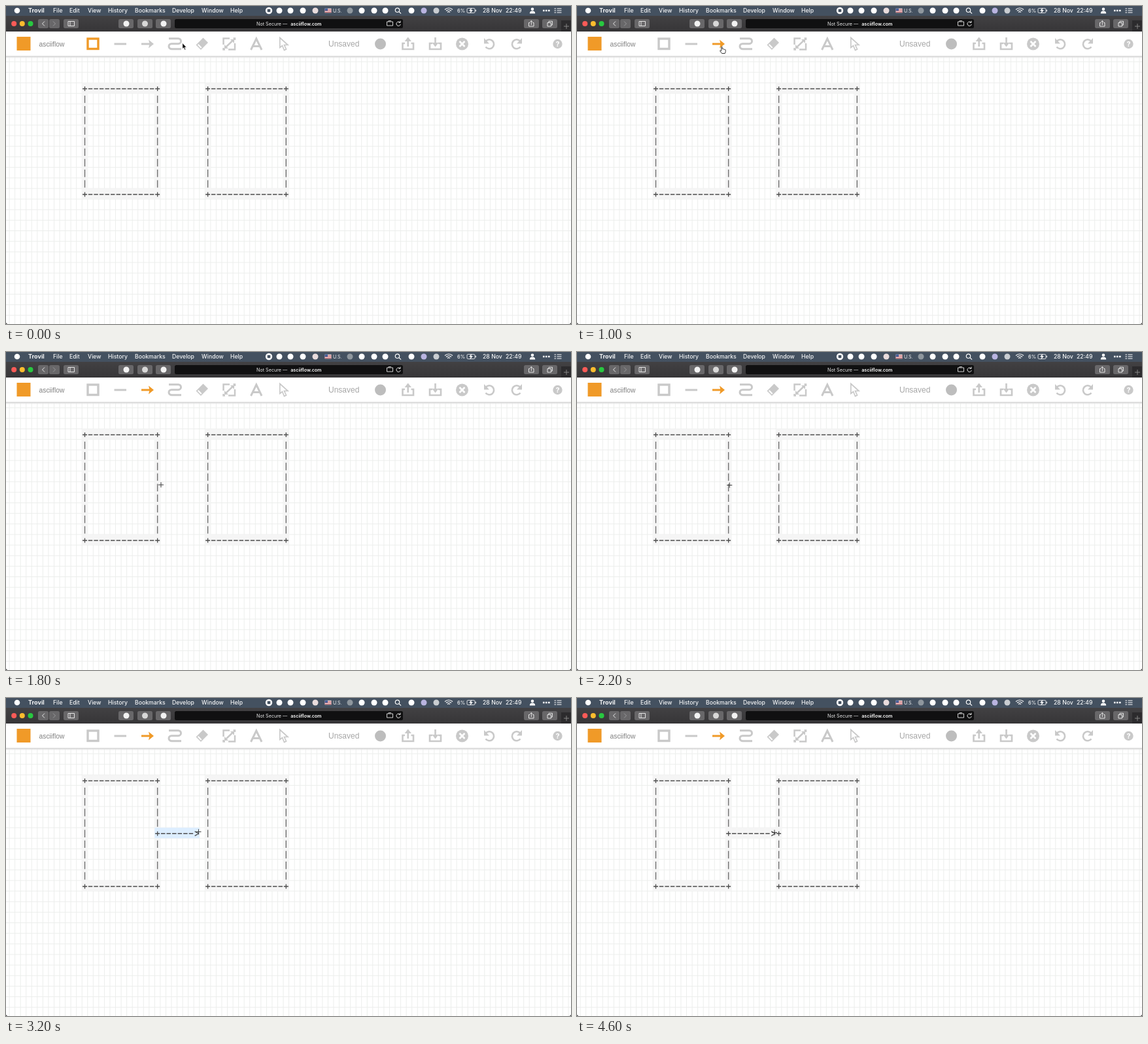
These frames come from a looping animation (864x486 px, 4.8 s). An HTML page:

```html
<!DOCTYPE html>
<html lang="en">
<head>
<meta charset="utf-8">
<title>Drawing an arrow</title>
<style>
  html, body { margin: 0; width: 100%; height: 100%; overflow: hidden; background: #111; }
  svg { display: block; width: 864px; height: 486px; }
  text { font-family: Inter, "Liberation Sans", sans-serif; white-space: pre; }
  .menu { font-size: 8.7px; font-weight: 500; fill: #f4f5f6; }
  .tool { fill: none; stroke: #c9c9c9; stroke-width: 3; }
  .tool .solid { fill: #c9c9c9; stroke: none; }
  .tool.on { stroke: #f09a28; }
  .tool.on .solid { fill: #f09a28; }
  .ui { fill: none; stroke: #e6e6e6; stroke-width: 1; }
  .glyphs { fill: none; stroke: #4c4c4c; stroke-width: 1.3; }
  .bars { fill: none; stroke: #707070; stroke-width: 1.4; }
</style>
</head>
<body>
<svg viewBox="0 0 864 486">
  <defs>
    <linearGradient id="bar" x2="0" y2="1">
      <stop stop-color="#424143"/><stop offset="1" stop-color="#363537"/>
    </linearGradient>
    <linearGradient id="shade" x2="0" y2="1">
      <stop stop-color="#c4c4c4"/><stop offset="1" stop-color="#fff" stop-opacity="0"/>
    </linearGradient>
  </defs>

  <!-- page -->
  <path d="M0 39H864V483a3 3 0 0 1-3 3H3a3 3 0 0 1-3-3Z" fill="#fff"/>
  <path id="grid" stroke="#eceeec" fill="none"/>
  <g id="board"></g>
  <g id="preview"></g>

  <!-- drawing toolbar -->
  <rect y="39" width="864" height="38" fill="#fff"/>
  <rect y="76.500" width="864" height="4.500" fill="url(#shade)"/>
  <rect x="16.500" y="47" width="21" height="21" fill="#f09a28"/>
  <text x="50.500" y="61.500" font-size="10.3" fill="#808080" style="font-family:'Liberation Sans',sans-serif">asciiflow</text>
  <text x="493" y="62.300" font-size="12" fill="#a6a6a6" style="font-family:'Liberation Sans',sans-serif">Unsaved</text>

  <g class="tool" id="boxTool"><rect x="125" y="50" width="16" height="15.500" stroke-width="3.400"/></g>
  <g class="tool"><path d="M165.500 58H184"/></g>
  <g class="tool" id="arrowTool"><path d="M207 58H221"/><path class="solid" d="M218 51.500L226 58L218 64.500L219.500 58Z"/></g>
  <g class="tool"><path d="M249 49.700H263.500a4 4 0 0 1 0 8H253a4 4 0 0 0 0 8H268"/></g>
  <g class="tool">
    <path class="solid" d="M301.500 48.500L309 56L298 67L290.500 59.500Z"/>
    <path d="M294.300 58L299.500 63.200L298 64.700L292.800 59.500Z" style="fill:#fff;stroke:none"/>
  </g>
  <g class="tool">
    <path d="M332.500 59V49.500H342M350 57V66.500H340M332.500 64V66.500H335M347.500 49.500H350V52M336 63L347 52.500" style="stroke-width:2.500"/>
    <path class="solid" d="M343 51H349V57ZM334 59V65H340Z"/>
  </g>
  <g class="tool"><path d="M374.500 67L382.800 50L391 67M378 61.500H388"/></g>
  <g class="tool"><path d="M418.800 48.500V63.500L422.500 60.500L425.500 67.500L428.500 66L425.500 59.500H431Z" style="stroke-width:1.700"/></g>

  <circle cx="572.500" cy="58" r="8.500" fill="#bdbdbd"/>
  <g class="tool" style="stroke-width:2.600">
    <path d="M610 57H606.500V66H623V57H619.500M614.700 62V53"/><path class="solid" d="M609.500 54L614.700 47.500L620 54Z"/>
    <path d="M652 57H648V66H665V57H661M656.500 48V57"/><path class="solid" d="M651.500 56L656.500 62.500L661.500 56Z"/>
    <circle class="solid" cx="697.500" cy="58" r="9.500"/>
    <path d="M693.500 54L701.500 62M701.500 54L693.500 62" stroke="#fff"/>
    <path d="M734 53.500A7 7 0 1 1 733.500 62.500"/><path class="solid" d="M731 49V57.500H739Z"/>
    <path d="M786 53.500A7 7 0 1 0 786.500 62.500"/><path class="solid" d="M789 49V57.500H781Z"/>
    <circle class="solid" cx="843.500" cy="58" r="7.200"/>
  </g>
  <text x="843.500" y="62" font-size="11" font-weight="700" fill="#fff" text-anchor="middle">?</text>

  <!-- browser bar -->
  <rect y="15" width="864" height="24" fill="url(#bar)"/>
  <circle cx="12.200" cy="27" r="4" fill="#fc5b57"/>
  <circle cx="24.800" cy="27" r="4" fill="#fdbc2e"/>
  <circle cx="37.500" cy="27" r="4" fill="#28c840"/>
  <g id="buttons" fill="#686769"></g>
  <rect x="258" y="20" width="349" height="14" rx="2.500" fill="#101011"/>
  <text x="383" y="29.700" font-size="7.200" fill="#e8e8e8">Not Secure —</text>
  <text x="435.300" y="29.700" font-size="7.100" font-weight="600" fill="#fff">asciiflow.com</text>
  <g class="ui">
    <path d="M59 23.500L55.500 27L59 30.500"/><path d="M72 23.500L75.500 27L72 30.500" stroke="#98989a"/>
    <path d="M95 23.500H104.500V30.500H95ZM98 23.500V30.500"/>
    <path d="M582.500 24H591.500V30H582.500ZM585 24V22.700H589" stroke-width=".9"/>
    <path d="M602.500 25A3.200 3.200 0 1 0 603.300 28M600.500 25.300H603V22.700"/>
    <path d="M801 25.500H799.500V31H807V25.500H805.500M803.300 29V22.500M801.300 24.500L803.300 22.500L805.300 24.500"/>
    <path d="M828 25.500H833.500V31H828ZM830 25.500V23.300H835.500V29H833.500"/>
  </g>
  <circle cx="184" cy="27" r="4.500" fill="#f2f2f2"/>
  <circle cx="212.500" cy="27" r="4.500" fill="#d8d8d8"/>
  <circle cx="241" cy="27" r="4.500" fill="#f2f2f2"/>
  <rect x="849" y="22" width="15" height="17" fill="#2c2b2d"/>
  <path d="M853 31H861M857 27V35" stroke="#858585"/>

  <!-- menu bar -->
  <rect width="864" height="15" fill="#445160"/>
  <circle cx="17" cy="7" r="4.300" fill="#fff"/>
  <g id="menus" class="menu"></g>
  <g id="marks"></g>
  <circle cx="402" cy="7" r="5.200" fill="#fff"/><rect x="399.700" y="4.700" width="4.600" height="4.600" rx=".7" fill="#445160"/>
  <rect x="487.500" y="3.700" width="10" height="6.600" fill="#f1eeee"/>
  <path d="M487.500 5.300H497.500M487.500 7.400H497.500M487.500 9.500H497.500" stroke="#c8555c"/>
  <rect x="487.500" y="3.700" width="4.500" height="3.600" fill="#46609a"/>
  <g class="ui" style="stroke:#fff;stroke-width:1.200">
    <circle cx="598.500" cy="6.300" r="3.200"/><path d="M601 8.700L604 11.700"/>
    <path d="M671 5.500Q677 .5 683 5.500M673 7.500Q677 4 681 7.500M675 9.400Q677 8 679 9.400"/>
    <rect x="705" y="3.500" width="12" height="7" rx="1.500" style="stroke-width:.8"/>
    <path d="M718.300 5.700V8.300"/>
    <path d="M838.500 4H841M842.500 4H849.500M838.500 7H841M842.500 7H849.500M838.500 10H841M842.500 10H849.500"/>
  </g>
  <path d="M712 2.500L708 7.500H710.500L709.500 11.500L714 6.300H711.500Z" fill="#fff"/>
  <circle cx="805" cy="4.700" r="2.300" fill="#fff"/><path d="M800.800 11.500Q800.800 7.500 805 7.500T809.200 11.500Z" fill="#fff"/>
  <path d="M821 5.700h2.600v2.600h-2.600zm4 0h2.600v2.600h-2.600zm4 0h2.600v2.600h-2.600z" fill="#fff"/>

  <!-- pointers -->
  <path id="arrow" d="M0 0V9L2 7.300L3.500 10.700L5 10L3.600 6.700H6.300Z" fill="#111" stroke="#fff" stroke-width=".7"/>
  <path id="hand" d="M-1.300 5.500V.6Q-.8-.6.200.6V3.700Q1.200 3 1.900 4Q3 3.400 3.600 4.500Q5.200 4.200 5.200 5.700V7.500Q5 9 4.200 10.500H-.4L-3.400 6.700Q-3.300 5-1.300 6.500Z" fill="#fff" stroke="#222" stroke-width=".9"/>
  <path id="cross" d="M-4 0H4M0-4V4" fill="none" stroke="#3c3c3c" stroke-width="1"/>
</svg>
<script>
  const LOOP = 4800, CW = 8.55, CH = 16.15, X0 = 120.5, Y0 = 126.5;
  const $ = id => document.getElementById(id);
  const colX = c => X0 + c * CW, rowY = r => Y0 + r * CH;
  // Top left corner of a cell; characters sit a little below its middle.
  const cellX = c => colX(c - .5), cellY = r => rowY(r - .5) - 1;

  // One drawn character, centred in its cell.
  const shapes = {
    '-': 'm-3.2 0h6.4',
    '|': 'm0-5.700v11.400',
    '+': 'm-3.500 0h7m-3.500-3.500v7',
    '>': 'm-2.800-3.400l5.800 3.400l-5.800 3.400'
  };
  const glyph = (ch, c, r) => `M${colX(c)} ${rowY(r)}${shapes[ch]}`;
  const cells = (c, r, w, h, fill) =>
    `<rect x="${cellX(c)}" y="${cellY(r)}" width="${w * CW}" height="${h * CH}" fill="${fill}"/>`;
  const strokes = (d, name = 'glyphs') => `<path class="${name}" d="${d}"/>`;

  function box(c, w, h, joint) {
    const end = c + w, fill = '#f5f5f5';
    let d = '', bars = '';
    for (const r of [0, h])
      for (let i = c; i <= end; i++) d += glyph(i === c || i === end ? '+' : '-', i, r);
    for (let r = 1; r < h; r++)
      for (const i of [c, end])
        if (i === joint && r === 5) d += glyph('+', i, r);
        else bars += glyph('|', i, r);
    return cells(c, 0, w + 1, 1, fill) + cells(c, h, w + 1, 1, fill) +
      cells(c, 1, 1, h - 1, fill) + cells(end, 1, 1, h - 1, fill) +
      strokes(bars, 'bars') + strokes(d);
  }

  function arrow(len, fill) {
    let d = glyph('+', 13, 5);
    for (let i = 1; i < len; i++) d += glyph('-', 13 + i, 5);
    if (len) d += glyph('>', 13 + len, 5);
    return cells(13, 5, len + 1, 1, fill) + strokes(d);
  }

  let lines = '';
  for (let c = -13; cellX(c) < 864; c++) lines += `M${cellX(c)} 78V486`;
  for (let r = -2; cellY(r) < 486; r++) lines += `M0 ${cellY(r)}H864`;
  $('grid').setAttribute('d', lines);

  $('buttons').innerHTML = [[49, 16], [66, 16], [88, 23], [172, 23], [201, 23], [229, 23], [792, 23], [820, 23]]
    .map(([x, w]) => `<rect x="${x}" y="20" width="${w}" height="14" rx="2.500"/>`).join('');

  $('menus').innerHTML = [
    [34, 'Trovil', 9.1, 700], [72, 'File'], [97, 'Edit'], [125, 'View'], [156, 'History'],
    [197, 'Bookmarks'], [254, 'Develop'], [299, 'Window'], [343, 'Help'],
    [500, 'U.S.', 7, 400], [690, '6%', 7.5], [729, '28 Nov'], [764, '22:49']
  ].map(([x, s, size = 8.7, weight = 500]) =>
    `<text x="${x}" y="10.200" style="font-size:${size}px;font-weight:${weight}">${s}</text>`).join('');

  $('marks').innerHTML = [
    [418, '#fff'], [435, '#fff'], [454, '#fff'], [473, '#e9dcdc'], [526, '#8f979e'], [544, '#fff'],
    [563, '#fff'], [580, '#fff'], [620, '#fff'], [639, '#b9b4e0'], [658, '#c9cdd1']
  ].map(([x, fill]) => `<circle cx="${x}" cy="7" r="4.500" fill="${fill}"/>`).join('');

  // Start time, pointer, x, y
  const steps = [
    [0, 'arrow', 269.8, 56.5], [200, 'arrow', 254, 57], [400, 'hand', 232, 57],
    [600, 'hand', 222.5, 57], [800, 'hand', 220, 58], [1000, 'hand', 222, 62],
    [1200, 'cross', 237, 165], [1400, 'cross', 239.5, 202.5], [1800, 'cross', 237, 203],
    [2000, 'cross', 234.5, 203.5], [2200, 'cross', 233.3, 203.5], [2600, 'cross', 241, 204],
    [2800, 'cross', 263, 204], [3000, 'cross', 284, 204.3], [3200, 'cross', 294.5, 204.5],
    [3400, 'cross', 299, 205], [3600, 'cross', 302, 205.5]
  ];
  const PICK = 1000, PRESS = 2600, RELEASE = 4200;

  let last = '';
  function draw(t) {
    const [start, kind, x, y] = steps.filter(s => s[0] <= t).pop();
    const released = t >= RELEASE;
    const key = start + '/' + released;
    if (key === last) return;
    last = key;

    for (const id of ['arrow', 'hand', 'cross']) $(id).style.display = id === kind ? '' : 'none';
    $(kind).setAttribute('transform', `translate(${x} ${y})`);
    $('boxTool').classList.toggle('on', t < PICK);
    $('arrowTool').classList.toggle('on', t >= PICK);

    const len = t < PRESS ? -1 : Math.floor((x - cellX(13)) / CW);
    $('board').innerHTML = box(0, 13, 10) + box(22, 14, 10, len === 8 ? 22 : -1);
    $('preview').innerHTML = len < 0 ? '' : arrow(len, released ? '#f5f5f5' : '#def');
  }

  const origin = performance.now();
  function tick() {
    draw((performance.now() - origin) % LOOP);
    requestAnimationFrame(tick);
  }
  tick();
</script>
</body>
</html>
```
